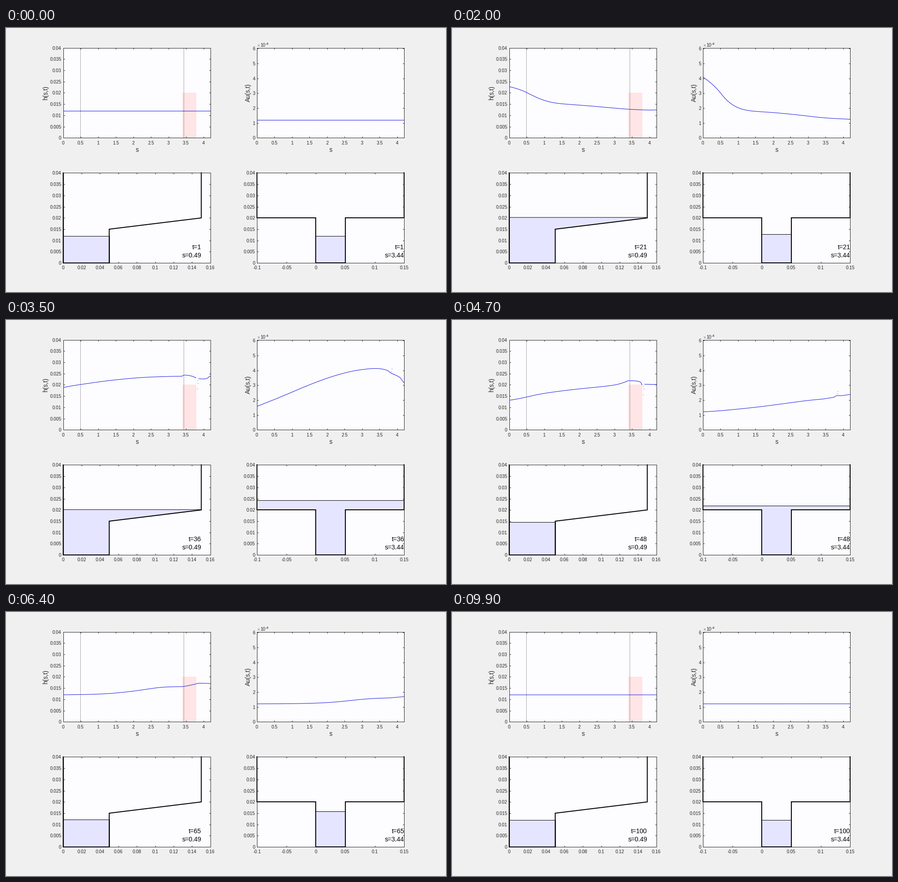
Animation, 966 px wide and 580 px high, one loop 10 s. Source, as a matplotlib script:

```python
import numpy as np
import matplotlib.pyplot as plt
from matplotlib.animation import FuncAnimation
from matplotlib.patches import Polygon, Rectangle

W, H, PX = 966, 580, 0.72          # stage in pixels, points per pixel
G, SLOPE, MANNING = 9.81, 0.01, 0.02
N, LENGTH = 168, 4.2
DX = LENGTH / N
STEPS = 80                          # time steps per second
SECONDS = 100
PLAIN, TOWN = 19, 137               # cells shown as cross-sections

centres = (np.arange(N) + 0.5) * DX
faces = np.arange(N + 1) * DX
city = (centres > 3.4) & (centres < 3.8)
exit_cell = np.flatnonzero(city)[-1] + 1

# Cross-section tables: flow area against depth for plain and city
depths = np.linspace(0, 0.1, 4001)
over = np.maximum(depths - 0.02, 0)
plain_area = 0.05 * depths + 10 * np.clip(depths - 0.015, 0, 0.005) ** 2 + 0.1 * over
city_area = 0.05 * depths + 0.2 * over


def depth_of(area):
    return np.where(city, np.interp(area, city_area, depths),
                    np.interp(area, plain_area, depths))


def wetted(h):
    plain = np.interp(h, [0, 0.015, 0.02, 0.12], [0.05, 0.08, 0.1851, 0.3851])
    town = np.interp(h, [0, 0.02, 0.0202, 0.12], [0.05, 0.09, 0.2904, 0.49])
    return np.where(city, town, plain)


def to_faces(v):
    out = np.empty(N + 1)
    out[0], out[-1] = v[0], v[-1]
    out[1:-1] = (v[:-1] + v[1:]) / 2
    return out


def simulate():
    """Flood wave in a sloping channel, staggered grid; one state per second."""
    dt = 1 / STEPS
    area = np.full(N, 0.0006)
    base = 0.0006 * (0.0006 / 0.074) ** (2 / 3) * SLOPE ** 0.5 / MANNING
    flow = np.full(N + 1, base)
    states = []
    for n in range(1, SECONDS * STEPS + 1):
        h = depth_of(area)
        af = to_faces(area)
        radius = af / to_faces(wetted(h))
        u = flow / af
        carried = (flow[:-1] + flow[1:]) / 2 * u[:-1]
        push = np.full(N + 1, G * SLOPE) * af
        push[1:-1] -= (np.diff(carried) + G * af[1:-1] * np.diff(h)) / DX
        drag = G * MANNING ** 2 * np.abs(u) / radius ** (4 / 3)
        flow = (flow + dt * push) / (1 + dt * drag)
        flow[0] = base + (5.5e-4 - base) * np.exp(-(n * dt - 25.3) ** 2 / 46.5)
        flow[1:-1] += 0.03 * np.diff(flow, 2)
        area = np.maximum(area - dt / DX * np.diff(flow), 1e-4)
        if n % STEPS == 0:
            states.append((depth_of(area), flow.copy()))
    return states


states = simulate()

plt.rcParams['font.family'] = 'Liberation Sans'
INK = '#262626'
fig = plt.figure(figsize=(W / 100, H / 100), dpi=100, facecolor='#f0f0f0')


def panel(left, bottom, xlim, ylim, xticks, yticks, ylabels=None):
    ax = fig.add_axes([left, bottom, 0.3347, 0.3412], facecolor='#fdfdff')
    ax.set(xlim=xlim, ylim=ylim)
    ax.set_xticks(xticks, [f'{v:g}' for v in xticks])
    ax.set_yticks(yticks, ylabels or [f'{v:g}' for v in yticks])
    ax.tick_params(direction='in', top=True, right=True, length=3.2 * PX,
                   width=PX, color=INK, labelcolor=INK, labelsize=10 * PX)
    ax.tick_params(axis='x', pad=6.3 * PX)
    ax.tick_params(axis='y', pad=4 * PX)
    for spine in ax.spines.values():
        spine.set(linewidth=PX, color=INK)
    return ax


def label(x, y, text, size=13.5, color=INK, **kw):
    return fig.text(x / W, 1 - y / H, text, fontsize=size * PX, color=color, **kw)


LEFT, RIGHT, LOW, HIGH = 0.13, 0.5703, 0.11, 0.5838
s_ticks = np.arange(0, 4.1, 0.5)
h_ticks = np.round(np.arange(9) * 0.005, 3)

ax_h = panel(LEFT, HIGH, (0, LENGTH), (0, 0.04), s_ticks, h_ticks)
ax_q = panel(RIGHT, HIGH, (0, LENGTH), (0, 6.05e-4), s_ticks,
             np.arange(7) * 1e-4, [str(k) for k in range(7)])
ax_l = panel(LEFT, LOW, (0, 0.16), (0, 0.04),
             np.round(np.arange(9) * 0.02, 2), h_ticks)
ax_r = panel(RIGHT, LOW, (-0.1, 0.15), (0, 0.04),
             np.round(np.arange(6) * 0.05 - 0.1, 2), h_ticks)

for x in (288, 713):
    label(x, 272.5, 's', ha='center')
for x, text in ((87, 'h(s,t)'), (531.5, 'Au(s,t)')):
    label(x, 142.5, text, rotation=90, ha='center', va='center')
label(551, 41, '×', 10, '#808080')
label(558, 41, '10', 10)
label(569.5, 37, '-4', 8)

ax_h.add_patch(Rectangle((3.4, 0), 0.4, 0.02, facecolor='#ffe5e5'))
for cell in (PLAIN, TOWN):
    ax_h.axvline(centres[cell], color='k', lw=PX, ls=(0, (1, 2)))

BLUE = '#1414e0'
h_line, = ax_h.plot([], [], color=BLUE, lw=PX)
q_line, = ax_q.plot([], [], color=BLUE, lw=PX)
specks = dict(color=BLUE, ls='', marker='s', ms=PX, mew=0)
h_dots, = ax_h.plot([], [], **specks)
q_dots, = ax_q.plot([], [], **specks)


def section(ax, bed):
    ax.plot(*zip(*bed), color='k', lw=2 * PX, zorder=4, clip_on=False,
            solid_joinstyle='miter')
    water = Polygon([(0, 0), (0.05, 0), (0, 0.01)], facecolor='#e5e5ff',
                    edgecolor='k', lw=PX, zorder=2)
    return ax.add_patch(water)


water_l = section(ax_l, [(0, 0.04), (0, 0), (0.05, 0), (0.05, 0.015),
                         (0.15, 0.02), (0.15, 0.04)])
water_r = section(ax_r, [(-0.1, 0.04), (-0.1, 0.02), (0, 0.02), (0, 0), (0.05, 0),
                         (0.05, 0.02), (0.15, 0.02), (0.15, 0.04)])

clocks = []
for x, cell in ((428.6, PLAIN), (874, TOWN)):
    clocks.append(label(x, 486, '', 14, 'k', ha='right'))
    label(x, 504, f's={centres[cell]:.2f}', 14, 'k', ha='right')


def plain_water(h):
    bank = min(h, 0.02)
    x = 0.05 + 20 * np.clip(h - 0.015, 0, 0.005)
    return [(0, h), (0, 0), (0.05, 0), (0.05, min(h, 0.015)), (x, bank), (x, h)]


def town_water(h):
    bank = min(h, 0.02)
    x0, x1 = (-0.1, 0.15) if h > 0.02 else (0, 0.05)
    return [(x0, h), (x0, bank), (0, bank), (0, 0), (0.05, 0),
            (0.05, bank), (x1, bank), (x1, h)]


def update(i):
    h, q = states[i]
    hs, qs = h.copy(), q.copy()
    # Broken, speckled curve where the flooded city drains back to the river
    k = np.clip((h[exit_cell - 2] - 0.017) / 0.003, 0, 1)
    if k > 0:
        hs[exit_cell:exit_cell + 2] = np.nan
        below = h[exit_cell + 2] - k * np.array([0.0008, 0.002, 0.0045])
        h_dots.set_data([3.82, 3.84, 3.83], below)
        q_dots.set_data([3.83, 3.84], q[exit_cell + 1] + k * np.array([1.2e-5, 3e-5]))
    else:
        h_dots.set_data([], [])
        q_dots.set_data([], [])
    h_line.set_data(np.r_[0, centres, LENGTH], np.r_[hs[0], hs, hs[-1]])
    q_line.set_data(faces, qs)
    water_l.set_xy(plain_water(h[PLAIN]))
    water_r.set_xy(town_water(h[TOWN]))
    for clock in clocks:
        clock.set_text(f't={i + 1}')
    return h_line, q_line, h_dots, q_dots, water_l, water_r, *clocks


anim = FuncAnimation(fig, update, frames=SECONDS, interval=100, repeat=True,
                     repeat_delay=0, blit=False)
plt.show()
```
